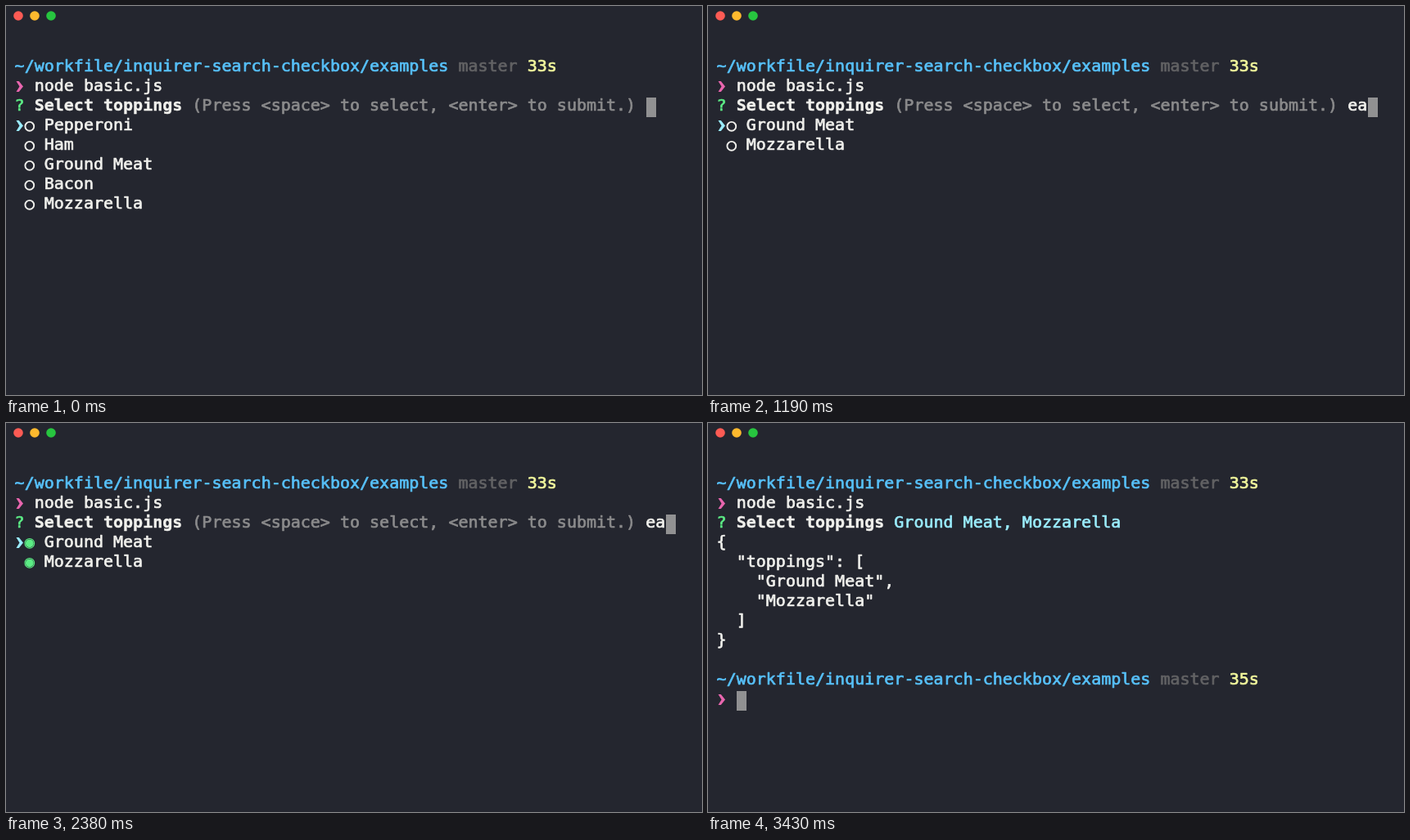
Animation of 850x476 px, one loop 3500 ms. Source, as an HTML page with a canvas:

```html
<!DOCTYPE html>
<html lang="en">
<head>
<meta charset="utf-8">
<title>Search checkbox prompt</title>
<style>
html, body { margin: 0; width: 100%; height: 100%; overflow: hidden; background: #24262f; }
canvas { display: block; }
</style>
</head>
<body>
<canvas id="stage" width="850" height="476"></canvas>
<script>
const ctx = document.getElementById('stage').getContext('2d');
const LOOP = 3500, LEFT = 10.6, TOP = 64, ROW = 24, CELL = 12.04;
const FONT = '20px "DejaVu Sans Mono", Menlo, monospace';
const C = {
  bg: '#24262f', white: '#f0f0ec', path: '#57c1fa', pink: '#e866ae', green: '#5cec85',
  yellow: '#f2f89d', cyan: '#9aecfd', branch: '#626264', dim: '#8b8b8c', cursor: '#919192'
};

// Key presses by time in ms
const TYPED = [[770, 'e'], [910, 'ea']];
const CHECK = [1260, 1540];
const MOVE = [1400, 1680];
const SUBMIT = 2590;

const TOPPINGS = ['Pepperoni', 'Ham', 'Ground Meat', 'Bacon', 'Mozzarella'];
const HINT = '(Press <space> to select, <enter> to submit.)';
const OUTPUT = JSON.stringify({ toppings: ['Ground Meat', 'Mozzarella'] }, null, 2).split('\n');

const colX = col => LEFT + col * CELL;
const rowY = row => TOP + row * ROW;

// A thin outline gives the heavier smoothing of the terminal
function text(row, col, str, color, bold) {
  const x = colX(col), y = rowY(row) + 16.3;
  ctx.font = (bold ? 'bold ' : '') + FONT;
  ctx.fillStyle = ctx.strokeStyle = color;
  ctx.lineWidth = bold ? .4 : .7;
  ctx.lineJoin = 'round';
  ctx.fillText(str, x, y);
  ctx.strokeText(str, x, y);
}

function disc(x, y, r, color) {
  ctx.fillStyle = color;
  ctx.beginPath();
  ctx.arc(x, y, r, 0, 7);
  ctx.fill();
}

function ring(x, y, r, width, color) {
  ctx.strokeStyle = color;
  ctx.lineWidth = width;
  ctx.beginPath();
  ctx.arc(x, y, r, 0, 7);
  ctx.stroke();
}

function chevron(row, color) {
  const y = rowY(row) + 10.5;
  ctx.fillStyle = color;
  ctx.beginPath();
  [[12.5, -6.5], [15.8, -6.5], [21, 0], [15.8, 6.5], [12.5, 6.5], [16.5, 0]]
    .forEach(([x, dy]) => ctx.lineTo(x, y + dy));
  ctx.fill();
}

function cursor(row, col) {
  ctx.fillStyle = C.cursor;
  ctx.fillRect(Math.round(colX(col) + .4), rowY(row), 12, ROW);
}

function shell(row, seconds) {
  text(row, 0, '~/workfile/inquirer-search-checkbox/examples', C.path);
  text(row, 45, 'master', C.branch);
  text(row, 52, seconds, C.yellow);
  chevron(row + 1, C.pink);
}

// Letters of the query must appear in order
const matches = (name, query) => new RegExp([...query].join('.*'), 'i').test(name);

function choices(t) {
  const query = TYPED.reduce((q, [at, s]) => t >= at ? s : q, '');
  const active = MOVE.filter(at => t >= at).length % 2;
  text(2, 18, HINT, C.dim);
  text(2, 64, query, C.white);
  cursor(2, 64 + query.length);
  TOPPINGS.filter(name => matches(name, query)).forEach((name, i) => {
    const row = 3 + i, x = 28.8, y = rowY(row) + 11.3;
    if (i === active) chevron(row, C.cyan);
    if (t >= CHECK[i]) {
      disc(x, y, 4.9, C.green);
      ring(x, y, 5.8, 1.1, C.green);
    } else {
      ring(x, y, 5.4, 1.9, C.white);
    }
    text(row, 3, name, C.white);
  });
}

function result() {
  text(2, 18, 'Ground Meat, Mozzarella', C.cyan);
  OUTPUT.forEach((line, i) => text(3 + i, 0, line, C.white));
  shell(10, '35s');
  cursor(11, 2);
}

function draw(now) {
  const t = now % LOOP;
  ctx.fillStyle = C.bg;
  ctx.fillRect(0, 0, 850, 476);
  ['#fc5b54', '#fdb92e', '#27c53f'].forEach((color, i) => disc(15 + 20 * i, 12, 5.8, color));
  shell(0, '33s');
  text(1, 2, 'node basic.js', C.white);
  text(2, 0, '?', C.green);
  text(2, 2, 'Select toppings', C.white, true);
  t < SUBMIT ? choices(t) : result();
  requestAnimationFrame(draw);
}
requestAnimationFrame(draw);
</script>
</body>
</html>
```
